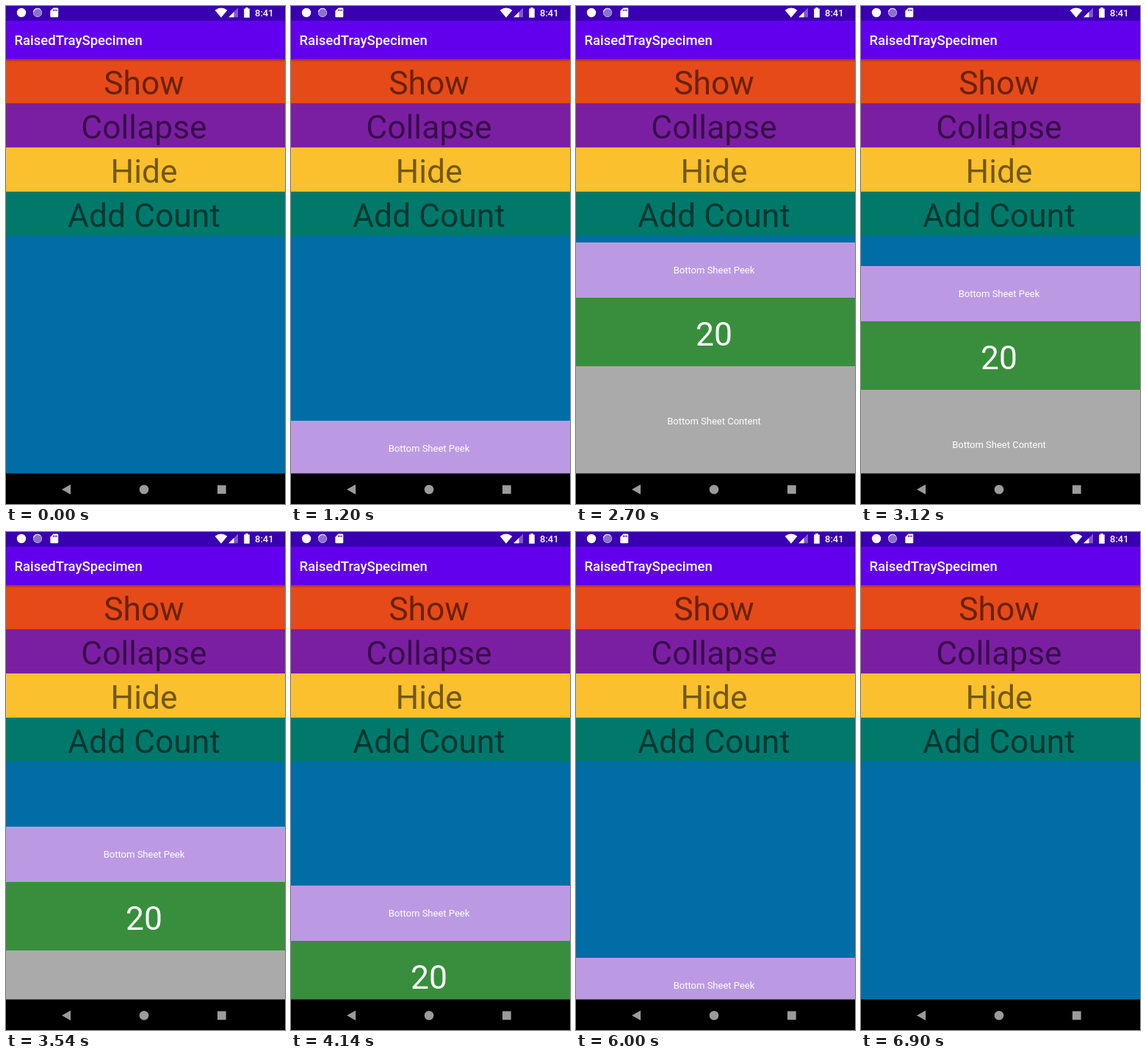
An HTML page that plays this animation: 380 px wide and 676 px high, repeating every 8 s.

```html
<!DOCTYPE html>
<html lang="en">
<head>
<meta charset="utf-8">
<title>Sliding sheet</title>
<style>
  html, body { margin: 0; width: 100%; height: 100%; overflow: hidden; background: #000; }
  svg { display: block; width: 100vw; height: 100vh; font-family: Roboto, sans-serif; }
  .big { font-size: 44.4px; text-anchor: middle; }
  .small { font-size: 13px; text-anchor: middle; }
</style>
</head>
<body>
<svg viewBox="0 0 380 676">
  <defs>
    <linearGradient id="shade" x2="0" y2="1">
      <stop offset="0" stop-opacity=".3"/>
      <stop offset="1" stop-opacity="0"/>
    </linearGradient>
  </defs>

  <rect width="380" height="635" fill="#006da6"/>
  <g id="buttons"></g>
  <rect y="72" width="380" height="4" fill="url(#shade)"/>

  <g id="sheet" fill="#fff">
    <rect width="380" height="75" fill="#bb9ae3"/>
    <rect y="75" width="380" height="93" fill="#388e3c"/>
    <rect y="168" width="380" height="150" fill="#aaa"/>
    <text class="small" x="188" y="42">Bottom Sheet Peek</text>
    <text class="big" x="188" y="139.6">20</text>
    <text class="small" x="188" y="247">Bottom Sheet Content</text>
  </g>

  <!-- status bar and title -->
  <rect width="380" height="20" fill="#3900b1"/>
  <rect y="20" width="380" height="52" fill="#6200ee"/>
  <g fill="#fff">
    <text x="11.5" y="53" font-size="18.5" font-weight="500">RaisedTraySpecimen</text>
    <text x="339" y="14" font-size="13" font-weight="500">8:41</text>
    <circle cx="21" cy="9" r="6.2"/>
    <circle cx="43" cy="9" r="5.7" fill="#8b70cf" stroke="#b7a5e2"/>
    <path d="M37.4 8A5.7 5.7 0 0 1 47 5" fill="none" stroke="#e4dcf5" stroke-width="1.3"/>
    <path d="M64.5 2.5H70a1.2 1.2 0 0 1 1.2 1.2V14a1.2 1.2 0 0 1-1.2 1.2H61.500a1.2 1.2 0 0 1-1.200-1.200V6.700Z"/>
    <path d="M64.600 4.500v2.600M66.800 4.500v2.600M69 4.500v2.600" stroke="#3900b1" stroke-width="1.100"/>
    <path d="M284.600 5.700Q293 -.8 301.400 5.700L293 15.700Z"/>
    <path d="M316 2.500V15.300H303.200Z" fill-opacity=".35"/>
    <path d="M310.500 8V15.300H303.200Z"/>
    <path d="M326.300 2h3.400v1.400h2.100V15.800h-7.600V3.400h2.100Z"/>
  </g>

  <!-- navigation bar -->
  <rect y="634.5" width="380" height="41.500"/>
  <g fill="#9b9b9b">
    <path d="M76 656.300L88 649.500V663Z"/>
    <circle cx="188" cy="656.300" r="6.300"/>
    <rect x="288" y="650.500" width="11.700" height="11.700"/>
  </g>
</svg>
<script>
  const LOOP = 8000, STEP = 60;
  const HIDDEN = 635, OPEN = 317;
  const sheet = document.getElementById('sheet');

  const rows = [
    ['Show', '#e64a19'],
    ['Collapse', '#7b1fa2'],
    ['Hide', '#fbc02d'],
    ['Add Count', '#00796b']
  ];
  document.getElementById('buttons').innerHTML = rows.map(([label, color], i) => {
    const y = 72 + i * 60;
    return `<rect y="${y}" width="380" height="60" fill="${color}"/>
      <text class="big" x="188" y="${y + 48}" fill-opacity=".54">${label}</text>`;
  }).join('');

  // Finger drags: [time, top edge of the sheet]
  const drag = [
    [2640, OPEN], [2880, 331], [3120, 353], [3480, 393], [3540, 400],
    [4140, 480], [4320, 501], [4740, 559],
    [5700, 559], [6540, 613], [6600, 615], [6720, 615],
    [6780, 623], [6840, 630], [6900, HIDDEN]
  ];

  const quintOut = x => 1 - (1 - x) ** 5;

  function sheetTop(t) {
    if (t < 1200) return HIDDEN;
    if (t < 2640) {
      const x = Math.min(1, (t - 1180) / 400);
      return HIDDEN + (OPEN - HIDDEN) * quintOut(x);
    }
    const i = drag.findIndex(([time]) => time > t);
    if (i < 0) return HIDDEN;
    const [t0, y0] = drag[i - 1], [t1, y1] = drag[i];
    return y0 + (y1 - y0) * (t - t0) / (t1 - t0);
  }

  function draw(ms) {
    const t = Math.floor((ms % LOOP) / STEP) * STEP;
    sheet.setAttribute('transform', `translate(0 ${Math.round(sheetTop(t))})`);
  }

  const start = performance.now();
  function tick() {
    draw(performance.now() - start);
    requestAnimationFrame(tick);
  }
  tick();
</script>
</body>
</html>
```
